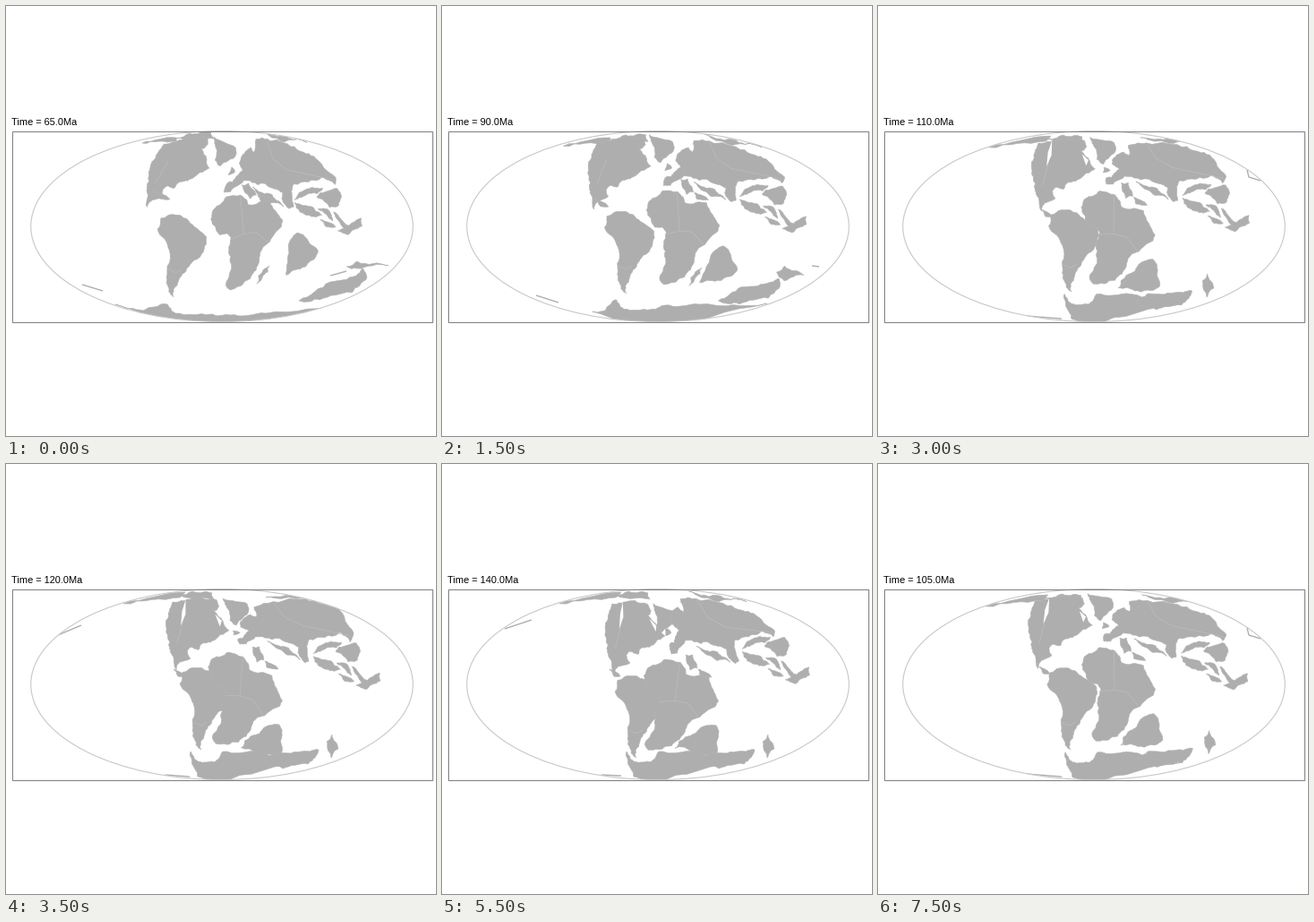
Animation, 480 px wide and 480 px high, one loop 8000 ms. Source, as a matplotlib script:

```python
import numpy as np
import matplotlib.pyplot as plt
from matplotlib.animation import FuncAnimation
from matplotlib.collections import LineCollection, PolyCollection
from matplotlib.patches import Circle, Ellipse, Rectangle

RISE = [65, 70, 80, 90, 100, 105, 110, 120, 130, 140, 145]
AGES = RISE + RISE[-2:4:-1]
LAND = "#aeaeae"


def pace(age):
    """Position along the poses 65, 100, 120 and 140 Ma."""
    return np.interp(age, [65, 80, 100, 120, 140, 145], [0, .38, 1, 2, 3, 3.1])


def pts(*flat):
    return np.array(flat, float).reshape(-1, 2)


def rough(p, rounds=3):
    """Jagged coast by seeded midpoint displacement."""
    rng = np.random.default_rng(len(p))
    for _ in range(rounds):
        d = np.roll(p, -1, 0) - p
        size = np.hypot(*d.T) + 1e-9
        push = rng.uniform(-1, 1, len(p)) * np.minimum(size * .14, 1.6) / size
        mid = p + d / 2 + np.c_[-d[:, 1], d[:, 0]] * push[:, None]
        p = np.stack([p, mid], 1).reshape(-1, 2)
    return p


def blend(poses, pos):
    i = min(int(pos), len(poses) - 2)
    return poses[i] + (poses[i + 1] - poses[i]) * (pos - i)


class Plate:
    """Outlines drawn at 100 Ma; subclasses move them."""

    def __init__(self, *coasts, seams=(), gaps=()):
        self.layers = [[rough(c) for c in coasts], list(seams), list(gaps)]
        self.pivot = coasts[0].mean(0)

    def at(self, pos):
        move = self.mover(pos)
        return [[move(p) for p in layer] for layer in self.layers]


class Rigid(Plate):
    """Shift x, shift y and turn for 65, 120 and 140 Ma."""

    def poses(self, early, late, last):
        self.keys = np.array([early, (0, 0, 0), late, last], float)
        return self

    def mover(self, pos):
        dx, dy, deg = blend(self.keys, pos)
        c, s = np.cos(np.radians(deg)), np.sin(np.radians(deg))
        turn = np.array([[c, s], [-s, c]])
        return lambda p: (p - self.pivot) @ turn + self.pivot + (dx, dy)


class Warp(Plate):
    """Three or four anchor points for 65, 100, 120 and 140 Ma."""

    def poses(self, *anchors):
        self.keys = anchors
        return self

    @staticmethod
    def basis(p, n):
        x, y = (p[:, 0] - 240) / 100, (p[:, 1] - 246) / 100
        return np.stack([np.ones_like(x), x, y, x * y][:n], 1)

    def mover(self, pos):
        ref = self.keys[1]
        n = len(ref)
        m = np.linalg.solve(self.basis(ref, n), blend(self.keys, pos))
        return lambda p: self.basis(p, n) @ m


class Morph:
    """Outline that changes from 65 to 100 Ma, then shifts."""

    def __init__(self, first, then, shift):
        self.first, self.then, self.shift = first, then, np.array(shift)

    def at(self, pos):
        t = min(pos, 1) ** 2
        p = self.first + (self.then - self.first) * t
        return [rough(p + self.shift * np.clip(pos - 1, 0, 1))], [], []


north_america = Warp(
    pts(172, 152, 200, 147, 226, 149, 228, 155, 221, 160, 229, 167, 236, 178,
        224, 184, 209, 193, 202, 196, 200, 201, 191, 200, 187, 205, 190, 212,
        182, 217, 177, 221, 175, 228, 172, 214, 168, 206, 166, 190, 164, 174),
    seams=[pts(184, 172, 176, 200)],
    gaps=[pts(188, 149, 187, 165, 181, 178, 183, 162),
          pts(222, 163, 229, 169, 226, 175)],
).poses(pts(176, 155, 156, 222, 227, 181, 228, 147),
        pts(172, 153, 173, 226, 236, 178, 229, 149),
        pts(186, 155, 188, 227, 249, 186, 238, 152),
        pts(190, 157, 190, 232, 249, 192, 232, 157))

greenland = Rigid(
    pts(231, 143, 258, 149, 260, 156, 246, 173, 239, 168, 235, 152),
).poses((-3, 6, 15), (11, 7, 0), (2, 15, 10))

south_america = Rigid(
    pts(189, 234, 200, 228, 211, 228, 222, 235, 242, 248, 243, 256, 236, 273,
        226, 284, 217, 302, 213, 310, 214, 319, 208, 314, 204, 304, 205, 280,
        203, 268, 187, 246),
    seams=[pts(204, 289, 213, 292, 219, 288)],
).poses((-21, 6, 7), (6, 0, 2.5), (5, 9, 2.5))

africa = Warp(
    pts(228, 223, 232, 213, 247, 203, 264, 206, 272, 219, 296, 221, 310, 247,
        308, 254, 284, 274, 277, 294, 270, 302, 258, 307, 246, 308, 242, 303,
        249, 282, 247, 260, 250, 250, 246, 244, 237, 243),
    seams=[pts(263, 207, 265, 250, 250, 252), pts(265, 250, 279, 252, 292, 267)],
).poses(pts(246, 213, 309, 242, 250, 317), pts(247, 203, 310, 250, 246, 308),
        pts(248, 210, 308, 267, 234, 312), pts(249, 218, 308, 267, 230, 319))

india = Rigid(
    pts(308, 275, 314, 280, 321, 303, 312, 310, 300, 313, 277, 312, 288, 294,
        297, 280),
).poses((26, -21, -26), (-10, 13, 17), (-10, 13, 22))

madagascar = Rigid(
    pts(288, 293, 286, 300, 274, 313, 276, 304),
).poses((6, -3, 0), (-9, 6, 15), (-11, 7, 18))

eurasia = Warp(
    pts(249, 197, 250, 189, 257, 188, 268, 178, 261, 171, 265, 163, 276, 158,
        281, 163, 282, 151, 302, 152, 345, 162, 370, 172, 389, 191, 385, 197,
        372, 190, 335, 194, 331, 200, 331, 214, 326, 215, 319, 206, 321, 201,
        300, 192, 283, 190, 272, 187, 257, 197),
    pts(296, 145, 335, 152, 366, 160, 325, 156),
    pts(284, 194, 308, 202, 320, 213, 303, 209),
    pts(251, 174, 257, 179, 249, 181),
    seams=[pts(302, 153, 310, 170, 328, 181, 386, 193)],
).poses(pts(244, 208, 319, 226, 368, 194, 291, 147),
        pts(250, 197, 329, 215, 388, 193, 301, 151),
        pts(262, 201, 336, 222, 387, 192, 297, 153),
        pts(257, 212, 330, 222, 371, 188, 282, 149))

apulia = Rigid(
    pts(268, 191, 276, 191, 281, 206, 273, 208),
    pts(282, 207, 297, 216, 284, 214),
).poses((-3, 7, -15), (7, 13, 0), (4, 22, 0))

east_asia = Rigid(
    pts(366, 204, 385, 200, 389, 207, 386, 219, 376, 221, 362, 209),
    pts(337, 211, 343, 203, 354, 199, 369, 199, 363, 205, 348, 207),
    pts(337, 214, 355, 219, 367, 229, 360, 231, 343, 225),
    pts(363, 222, 375, 224, 379, 236),
    pts(365, 234, 382, 243, 371, 242),
    pts(380, 226, 391, 238, 397, 242, 411, 234, 411, 243, 395, 252, 384, 247,
        391, 245),
).poses((-15, 4, -2), (6, 0, -1), (-2, -6, -2))

antarctica = Morph(
    pts(122, 333, 153, 340, 180, 333, 189, 343, 228, 344, 250, 345, 290, 343,
        382, 331, 240, 372),
    pts(218, 350, 214, 340, 210, 322, 218, 333, 238, 333, 246, 322, 284, 322,
        342, 333, 240, 356), (-4, -1))

australia = Morph(
    pts(327, 329, 362, 308, 391, 301, 398, 293, 403, 303, 386, 320, 350, 328),
    pts(288, 329, 303, 320, 332, 319, 352, 317, 349, 324, 340, 333, 312, 338),
    (-3, 2))

new_guinea = Morph(pts(380, 291, 392, 285, 427, 290, 392, 293),
                   pts(366, 304, 372, 296, 379, 312, 371, 322), (-8, 6))
central_america = Morph(pts(163, 206, 183, 216, 172, 215),
                        pts(177, 225, 189, 233, 182, 233), (10, 4))
alaska = Morph(pts(152, 153, 190, 147, 190, 151),
               pts(117, 160, 186, 147, 180, 153), (14, -4))
arctic = Morph(pts(187, 148, 205, 142, 229, 140, 232, 148),
               pts(184, 151, 205, 146, 226, 148, 228, 155), (4, -4))

PARTS = [arctic, alaska, north_america, greenland, central_america,
         south_america, africa, madagascar, india, eurasia, apulia,
         east_asia, antarctica, australia, new_guinea]

# Thin island chains near each key age
ISLANDS = {
    65: [pts(85, 311, 108, 318), pts(362, 301, 380, 296)],
    80: [pts(105, 323, 130, 331), pts(413, 290, 421, 291)],
    100: [pts(412, 183, 414, 191, 427, 195), pts(165, 346, 205, 349)],
    120: [pts(58, 191, 84, 180), pts(178, 347, 205, 349)],
    140: [pts(70, 184, 100, 174), pts(178, 347, 200, 348)],
}

fig = plt.figure(figsize=(4.8, 4.8), dpi=100, facecolor="white")
ax = fig.add_axes([0, 0, 1, 1])
ax.set(xlim=(0, 480), ylim=(480, 0))
ax.axis("off")

globe = Ellipse((241, 246), 426.5, 213, fc="none", ec="#c8c8c8", lw=.8, zorder=6)
ax.add_patch(globe)
ax.add_patch(Rectangle((6.5, 139.5), 469, 213, fc="none", ec="#7f7f7f",
                       lw=.72, zorder=7))
land = PolyCollection([], facecolors=LAND, edgecolors="#b4b4b4",
                      linewidths=.4, zorder=2)
seams = LineCollection([], colors="#bdbdbd", linewidths=.5, zorder=3)
gaps = PolyCollection([], facecolors="white", edgecolors="none", zorder=4)
islands = LineCollection([], colors=LAND, linewidths=1, zorder=5)
for layer in (land, seams, gaps, islands):
    ax.add_collection(layer, autolim=False)
    layer.set_clip_path(globe)
dot = ax.add_patch(Circle((121, 319.5), 2.4, fc="#ef5350", ec="none", zorder=8))
label = ax.text(6.5, 133, "", family="Liberation Sans", size=7.92, color="black")


def draw(i):
    age = AGES[i]
    shapes = [part.at(pace(age)) for part in PARTS]
    for k, layer in enumerate((land, seams, gaps)):
        layer.set_verts([p for groups in shapes for p in groups[k]])
    gaps.set_visible(age >= 100)
    islands.set_segments(ISLANDS[min(ISLANDS, key=lambda k: abs(k - age))])
    dot.set_visible(age == 80)
    label.set_text(f"Time = {age:.1f}Ma")
    return land, seams, gaps, islands, dot, label


anim = FuncAnimation(fig, draw, frames=len(AGES), interval=500,
                     repeat=True, repeat_delay=0, blit=False)
plt.show()
```
